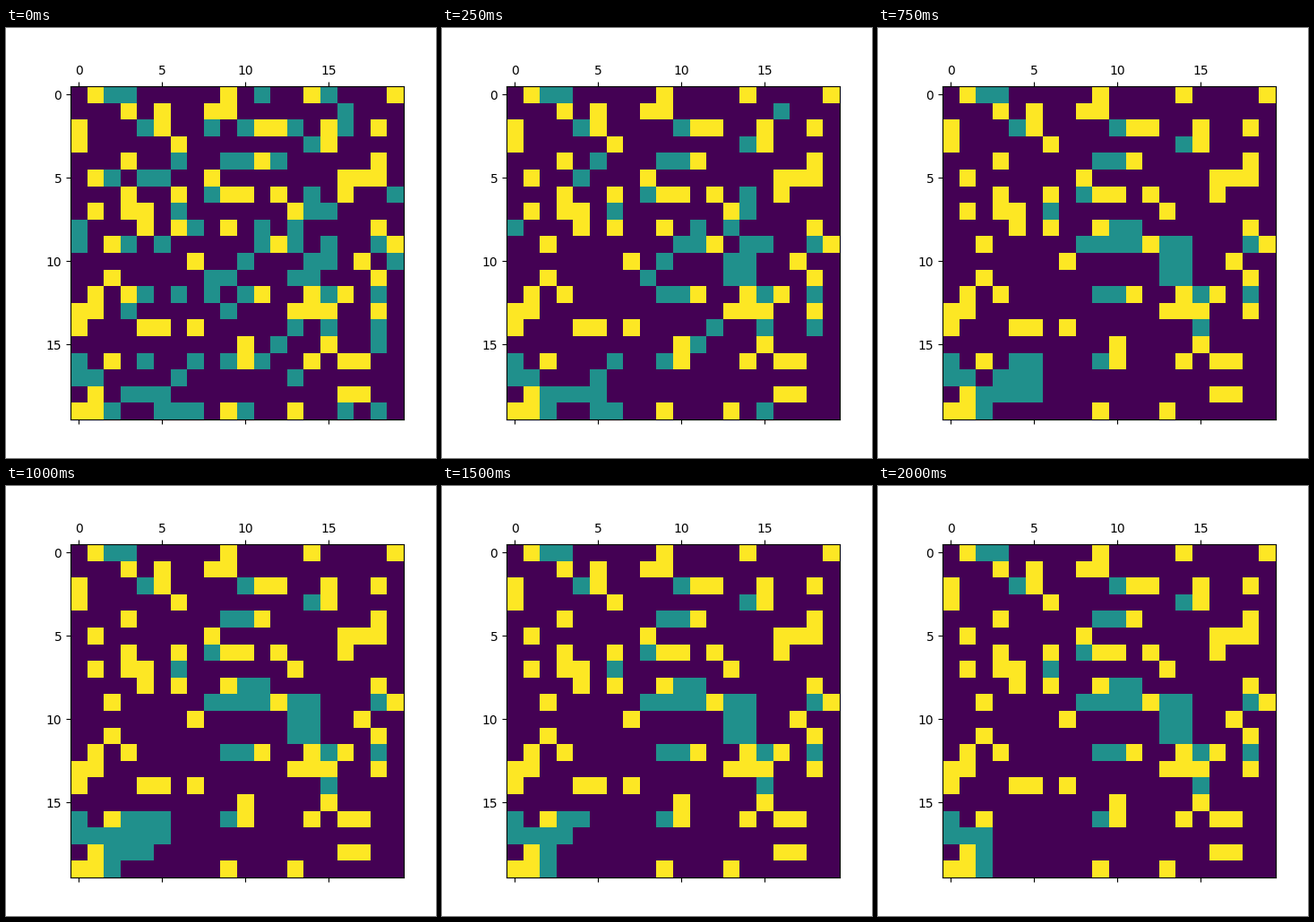
These frames come from a looping animation (480x480 px, 2250 ms). A matplotlib script:

```python
import matplotlib.pyplot as plt
import numpy as np
from matplotlib.animation import FuncAnimation

SIZE = 20
STEPS = 9
EMPTY, LIVE, WALL = 0, 1, 2

# Occupied columns, one list per row from the top.
WALLS = [
    [1, 9, 14, 19], [3, 5, 8, 9], [0, 5, 11, 12, 15, 18], [0, 6, 15],
    [3, 11, 18], [1, 8, 16, 17, 18], [3, 6, 9, 10, 12, 16], [1, 3, 4, 13],
    [4, 6, 9, 18], [2, 12, 19], [7, 17], [2, 18],
    [1, 3, 11, 14, 16], [0, 1, 13, 14, 15, 18], [0, 4, 5, 7], [10, 15],
    [2, 10, 14, 16, 17], [], [1, 16, 17], [0, 1, 9, 13],
]
SEEDS = [
    [2, 3, 11, 15], [16], [4, 8, 10, 13, 16], [14],
    [6, 9, 10, 12], [2, 4, 5], [8, 14, 19], [6, 14, 15],
    [0, 7, 11, 13], [0, 3, 5, 11, 13, 15, 18], [10, 14, 15, 19],
    [8, 9, 13, 14], [4, 6, 8, 10, 15, 18], [3, 9], [13, 15, 18], [12, 18],
    [0, 4, 7, 9, 11], [0, 1, 6, 13], [3, 4, 5], [2, 5, 6, 7, 10, 16, 18],
]


def initial_grid():
    grid = np.full((SIZE, SIZE), EMPTY)
    for row in range(SIZE):
        grid[row, WALLS[row]] = WALL
        grid[row, SEEDS[row]] = LIVE
    return grid


def step(grid):
    """East-south majority rule on a torus; walls only support live cells."""
    east = np.roll(grid, -1, axis=1)
    south = np.roll(grid, -1, axis=0)
    born = (grid == EMPTY) & (east == LIVE) & (south == LIVE)
    dies = (grid == LIVE) & (east == EMPTY) & (south == EMPTY)
    return np.where(born, LIVE, np.where(dies, EMPTY, grid))


states = [initial_grid()]
while len(states) < STEPS:
    states.append(step(states[-1]))

fig = plt.figure(figsize=(4.8, 4.8), dpi=100)
ax = fig.add_axes([0.15, 0.09, 0.775, 0.775])
image = ax.matshow(states[0], cmap="viridis", vmin=EMPTY, vmax=WALL)


def update(frame):
    image.set_data(states[frame])
    return [image]


anim = FuncAnimation(fig, update, frames=STEPS, interval=250, repeat=True)
plt.show()
```
